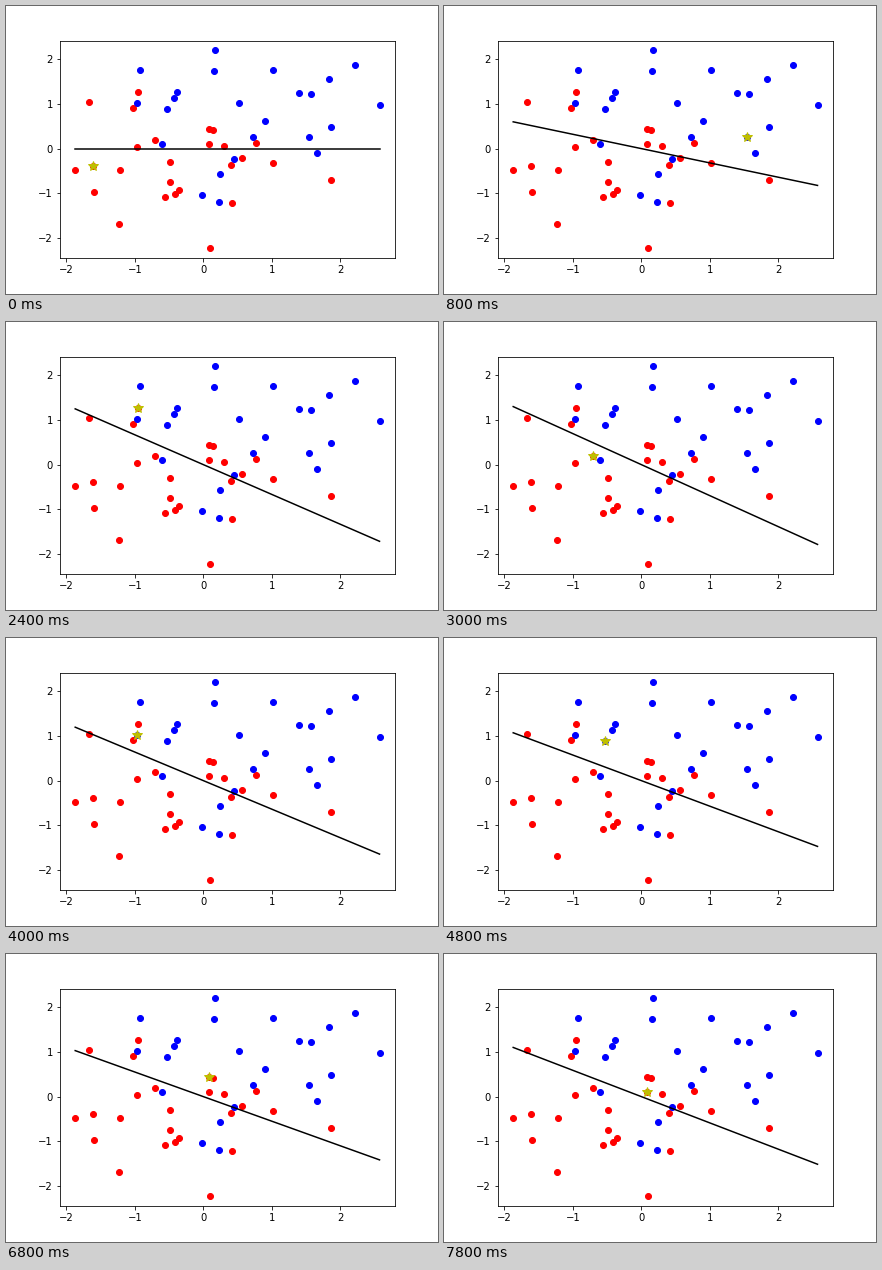
Animation of 432x288 px, one loop 8 s. Source, as a matplotlib script:

```python
import matplotlib.pyplot as plt
import numpy as np
from matplotlib.animation import FuncAnimation

FRAMES, STEP_MS = 40, 200

# Samples in the order they are visited; the last ten are never reached.
X = [-1.61, 2.58, -1.21, -1.67, 1.54, 0.73, -0.97, 1.66, 0.90, -0.48,
     -1.02, 1.57, -0.95, 0.25, -1.87, -0.70, 0.30, 1.87, 0.77, 0.14,
     -0.97, -0.60, 2.22, -0.43, -0.53, -0.48, -0.92, 1.87, 0.52, 0.42,
     0.41, 0.45, -0.41, 0.57, 0.08, 1.40, 1.84, 1.02, -0.38, 0.08,
     0.17, 0.16, 1.02, 0.23, -0.02, -1.59, -1.23, -0.56, -0.35, 0.10]
Y = [-0.39, 0.98, -0.48, 1.05, 0.26, 0.26, 0.04, -0.10, 0.62, -0.75,
     0.91, 1.23, 1.27, -0.57, -0.48, 0.19, 0.06, 0.49, 0.13, 0.42,
     1.02, 0.11, 1.88, 1.14, 0.89, -0.30, 1.76, -0.70, 1.02, -1.22,
     -0.37, -0.23, -1.02, -0.21, 0.44, 1.25, 1.56, -0.32, 1.27, 0.11,
     2.21, 1.74, 1.76, -1.19, -1.04, -0.97, -1.69, -1.08, -0.93, -2.23]
LABELS = "rbrrbbrbbr" "rbrbrrrbrr" "bbbbbrbrbr" "rbrrrbbrbr" "bbbbbrrrrr"

# Slope of the decision line as training goes on: (step, slope).
SLOPES = [(0, 0), (1, -0.12), (3, -0.29), (6, -0.382), (8, -0.452),
          (11, -0.61), (12, -0.668), (15, -0.695), (18, -0.697),
          (19, -0.712), (20, -0.640), (24, -0.573), (29, -0.526),
          (34, -0.551), (36, -0.600), (39, -0.589)]

xs, ys = np.array(X), np.array(Y)
labels = np.array(list(LABELS))
slopes = np.interp(np.arange(FRAMES), *zip(*SLOPES))

fig, ax = plt.subplots(figsize=(6, 4), dpi=72)
fig.subplots_adjust(left=0.125, right=0.9, bottom=0.125, top=0.88)

for color in "rb":
    chosen = labels == color
    ax.plot(xs[chosen], ys[chosen], color + "o")

ends = np.array([-1.87, 2.574])
line, = ax.plot(ends, 0 * ends, "k")
star, = ax.plot(xs[:1], ys[:1], "y*", markersize=10)

ax.set_xlim(-2.092, 2.797)
ax.set_ylim(-2.452, 2.421)
ax.set_xticks(range(-2, 3))
ax.set_yticks(range(-2, 3))


def update(step):
    line.set_ydata(slopes[step] * ends)
    star.set_data([xs[step]], [ys[step]])
    return line, star


anim = FuncAnimation(fig, update, frames=FRAMES, interval=STEP_MS,
                     repeat=True, repeat_delay=0)
plt.show()
```
